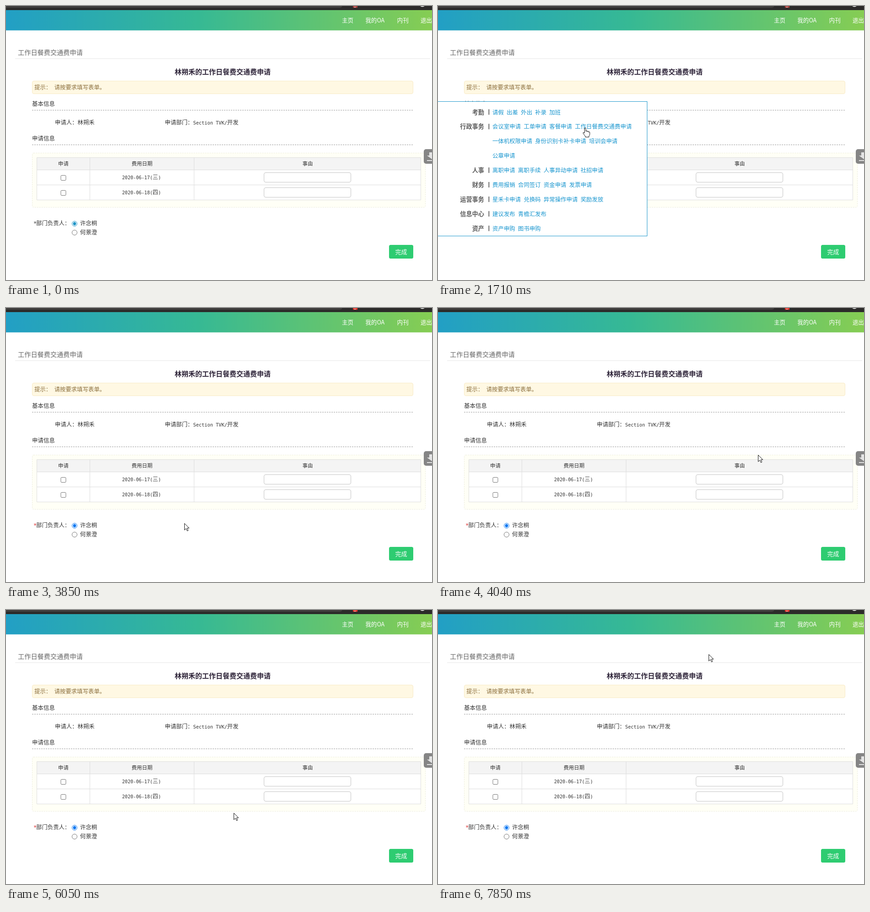
These frames come from a looping animation (932 px wide and 601 px high, 8000 ms). An HTML page:

```html
<!DOCTYPE html>
<html lang="zh-CN">
<head>
<meta charset="utf-8">
<style>
html, body { margin: 0; width: 100%; height: 100%; overflow: hidden; background: #fff; }
svg { display: block; width: 932px; height: 601px; font-family: "Noto Sans CJK SC", "Noto Sans CJK", sans-serif; }
.mono { font-family: "DejaVu Sans Mono", monospace; }
</style>
</head>
<body>
<svg id="stage" viewBox="0 0 932 601">
  <defs>
    <linearGradient id="bar">
      <stop offset="0" stop-color="#229fc5"/>
      <stop offset=".45" stop-color="#36b994"/>
      <stop offset="1" stop-color="#86cd53"/>
    </linearGradient>
  </defs>
  <g id="chrome"></g>
  <g id="form"></g>
  <g id="menu"></g>
  <g id="cursor" fill="#fff" stroke="#111" stroke-linejoin="round">
    <path id="arrow" d="M.5.5V15L4 11.7 6.4 17 8.7 16 6.4 10.8H10.8Z"/>
    <path id="hand" d="M-1.5 10.5V2a1.5 1.5 0 0 1 3 0V8.2a1.5 1.4 0 0 1 3 0V9a1.4 1.4 0 0 1 3 0V10a1.3 1.3 0 0 1 2.5 0V14.5Q10 17 8.2 18V20.5H.2V18.5L-4.5 12.3Q-5 10-3 10.3L-1.5 12Z"/>
  </g>
</svg>
<script>
const $ = id => document.getElementById(id);
const LOOP = 8000;
const ENTER = 330, MENU_OPEN = 600, CLICK = 2120, RELOAD = 2460, LOADED = 2620;
const LEFT = 57, RIGHT = 891;
const ROW_TOP = 359, ROW_HEIGHT = 33;

const text = (x, y, str, size = 12.4, fill = '#333', extra = '') =>
  `<text x="${x}" y="${y}" font-size="${size}" fill="${fill}" ${extra}>${str}</text>`;
const rect = (x, y, w, h, fill, extra = '') =>
  `<rect x="${x}" y="${y}" width="${w}" height="${h}" fill="${fill}" ${extra}/>`;
const line = (d, stroke, extra = '') =>
  `<path d="${d}" fill="none" stroke="${stroke}" ${extra}/>`;
const mono = (str, size = 10.1) => `<tspan class="mono" font-size="${size}">${str}</tspan>`;
const bold = 'font-weight="700"';
const medium = 'font-weight="500"';
const middle = 'text-anchor="middle"';

// Lays words out one after another, separated by a fixed gap.
function flow(x, y, words, size, gap, fill, extra) {
  return words.split(' ').map(word => {
    const out = text(x, y, word, size, fill, extra);
    const width = [...word].reduce((w, c) => w + (c < '\u0100' ? 0.72 : 1) * size, 0);
    x += width + gap;
    return out;
  }).join('');
}

function drawChrome() {
  $('chrome').innerHTML =
    rect(0, 0, 932, 9, '#2c2b2a') +
    rect(-10, -10, 746, 14, '#403e3d', 'rx="6"') +
    rect(759, -5, 10, 9, '#a8403c', 'id="badge" rx="1.5"') +
    line('M762 2.5h3', '#fff') +
    '<circle cx="911" cy="-5" r="7" fill="#ddd"/>' +
    rect(0, 9, 932, 44.5, 'url(#bar)') +
    flow(735, 35.5, '主页 我的OA 内刊 退出', 12.6, 26, '#fff', medium) +
    text(26, 107, '工作日餐费交通费申请', 14.2, '#666') +
    line('M20 115.5H928', '#e6e6e6');
}

function drawForm() {
  const section = (y, title) => text(LEFT, y, title, 12.5) +
    line(`M${LEFT} ${y + 9.5}H${RIGHT}`, '#999', 'stroke-dasharray="3 2"');
  const heading = (x, title) => text(x, 350, title, 11.4, '#333', `${middle} ${medium}`);
  const row = (date, day, i) => {
    const y = ROW_TOP + i * ROW_HEIGHT;
    return rect(68, y, 839, ROW_HEIGHT, '#fff', 'class="row"') +
      rect(120, y + 12.5, 11, 11, '#fff', 'rx="2" stroke="#767676"') +
      text(254, y + 21, mono(date + '(') + day + mono(')'), 12) +
      rect(564.5, y + 6.5, 190, 21, '#fff', 'rx="3.5" stroke="#c4c4c4"');
  };
  const option = (y, name, id = '') =>
    `<circle cx="150" cy="${y}" r="5.5" fill="#fff" stroke="#767676" ${id}/>` +
    text(162, y + 3.7, name);

  $('form').innerHTML =
    text(474, 150, '林朔禾的工作日餐费交通费申请', 15, '#2d2338', `${bold} ${middle}`) +
    rect(57.5, 164.5, 833, 28, '#fff8e3', 'rx="3.5" stroke="#f8ebc6"') +
    flow(62, 183, '提示： 请按要求填写表单。', 12.4, 6.5, '#8a6d3b') +
    section(219, '基本信息') +
    text(107, 260, '申请人：林朔禾') +
    text(347.5, 260, '申请部门：' + mono('Section TVK/', 10.3) + '开发') +
    section(295, '申请信息') +
    rect(57.5, 322.5, 860, 119, '#fffff6', 'rx="3" stroke="#ececdc" stroke-dasharray="3 2"') +
    rect(68, 333, 839, 26, '#f4f4f4') +
    heading(125.5, '申请') + heading(297.5, '费用日期') + heading(660, '事由') +
    row('2020-06-17', '三', 0) + row('2020-06-18', '四', 1) +
    line('M67.5 332.5h840v93h-840zM67.5 359.5h840m0 33h-840M183.5 332.5v93M411.5 332.5v93', '#ddd') +
    text(60, 481, '*', 12.4, '#333', 'id="star" class="mono"') +
    text(66, 481, '部门负责人：') +
    option(477.5, '许念桐', 'id="ring"') +
    '<circle id="dot" cx="150" cy="477.5" r="3.4"/>' +
    option(497, '何景澄') +
    rect(838, 524, 53, 30, '#2ecc71', 'rx="3.5"') +
    text(864.5, 544, '完成', 13, '#fff', middle) +
    rect(914, 314, 40, 32, '#858585', 'rx="5"') +
    '<path d="M926 321h6v15l-11-8h5zM921 338h11v2h-11z" fill="#e4e4e4"/>';
}

function drawMenu() {
  const groups = `考勤|请假 出差 外出 补录 加班
行政事务|会议室申请 工单申请 客餐申请 工作日餐费交通费申请
|一体机权限申请 身份识别卡补卡申请 培训会申请
|公章申请
人事|离职申请 离职手续 人事异动申请 社招申请
财务|费用报销 合同签订 资金申请 发票申请
运营事务|星禾卡申请 兑换码 异常操作申请 奖励发放
信息中心|建议发布 青檐汇发布
资产|资产申购 图书申购`;
  $('menu').innerHTML = rect(-1, 209.5, 458.5, 295, '#fff', 'stroke="#1f98cc"') +
    groups.split('\n').map((group, i) => {
      const [label, links] = group.split('|');
      const y = 237.5 + i * 31.9;
      const head = text(101, y, label, 13.2, '#5c5c5c', `${bold} text-anchor="end"`) +
        rect(110.5, y - 11, 1.8, 12, '#5c5c5c');
      return (label ? head : '') + flow(119, y, links, 12.45, 6.2, '#1996cf');
    }).join('');
}

// Each stroke of the pointer: when it starts, when it ends, and its path.
const strokes = [
  [330, 860, 'M310 588Q-60 220 46 236'],
  [1190, 1700, 'M46 236Q200 230 322 267'],
  [2620, 2900, 'M322 267L327 263'],
  [3290, 3850, 'M327 263C-20-30-20 655 388 472'],
  [3850, 4040, 'M388 472Q600 430 700 322'],
  [4100, 4850, 'M700 322C1310 200 500 150 131 250'],
  [4850, 4880, 'M131 250L104 282'],
  [4940, 5700, 'M104 282C20 400 30 560 317 496'],
  [5770, 6050, 'M317 496Q420 485 498 445'],
  [7250, 7850, 'M498 445Q545 330 592 97'],
].map(([start, end, d]) => {
  const path = document.createElementNS('http://www.w3.org/2000/svg', 'path');
  path.setAttribute('d', d);
  return { start, end, path, length: path.getTotalLength() };
});

function pointerAt(time) {
  const s = strokes.findLast(stroke => time >= stroke.start) || strokes[0];
  const u = Math.min(1, Math.max(0, (time - s.start) / (s.end - s.start)));
  return s.path.getPointAtLength(u * s.length);
}

const show = (id, on) => $(id).setAttribute('visibility', on ? 'visible' : 'hidden');
const paint = (el, color, part = 'fill') => el.setAttribute(part, color);

function render(time) {
  const menuOpen = time >= MENU_OPEN && time < RELOAD;
  const fresh = time >= LOADED;
  const { x, y } = pointerAt(time);
  const onLink = menuOpen && x > 119;

  show('menu', menuOpen);
  show('form', time < RELOAD || fresh);
  show('cursor', time >= ENTER);
  $('cursor').setAttribute('transform', `translate(${Math.round(x)} ${Math.round(y)})`);
  $('arrow').style.display = onLink ? 'none' : '';
  $('hand').style.display = onLink ? '' : 'none';

  const accent = fresh ? '#0d78f2' : '#1f95c8';
  paint($('ring'), accent, 'stroke');
  paint($('dot'), accent);
  paint($('star'), fresh ? '#d33' : '#444');
  paint($('badge'), time >= CLICK ? '#e23b32' : '#a8403c');

  const inTable = time >= ENTER && !menuOpen && x > 68 && x < 907;
  const hovered = inTable ? Math.floor((y - ROW_TOP) / ROW_HEIGHT) : -1;
  document.querySelectorAll('.row').forEach((row, i) =>
    paint(row, i === hovered ? '#f5f5f5' : '#fff'));
}

drawChrome();
drawForm();
drawMenu();
const start = performance.now();
function tick() {
  render((performance.now() - start) % LOOP);
  requestAnimationFrame(tick);
}
tick();
</script>
</body>
</html>
```
